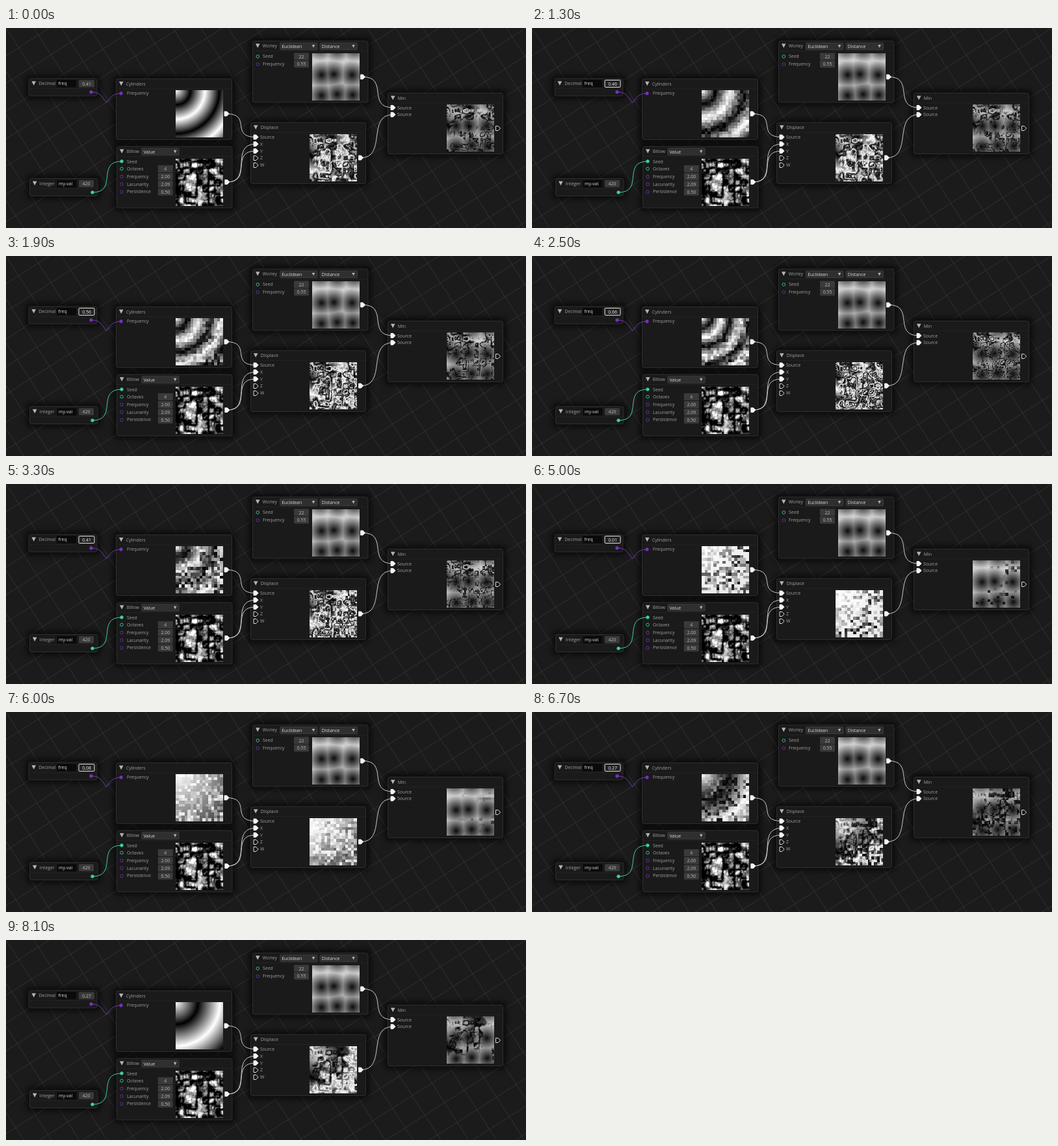
An HTML page with a canvas for the animation above (8200 ms loop, 800 by 309 pixels).

```html
<!DOCTYPE html>
<html lang="en">
<head>
<meta charset="utf-8">
<title>Noise graph</title>
<style>
  html, body { margin: 0; width: 100%; height: 100%; overflow: hidden; background: #1b1b1b; }
  svg, canvas { position: absolute; display: block; }
  svg { left: 0; top: 0; }
  text { font: 6.9px "Open Sans", "Noto Sans", sans-serif; fill: #a0a0a0; white-space: pre; }
  .bright { fill: #dcdcdc; }
  .mid { text-anchor: middle; fill: #bdbdbd; }
</style>
</head>
<body>
<svg id="stage" width="800" height="309" viewBox="0 0 800 309"></svg>
<script>
const LOOP = 8200, STEP = 100, SIZE = 73, TILES = 16, SPAN = 4, MAX_LAG = 500;
const TEAL = '#3ecfa5', PURPLE = '#7733bd', WHITE = '#f4f4f4';

// ---- static drawing helpers ----
const rect = (x, y, w, h, fill, stroke = 'none', r = 1.2) =>
  `<rect x="${x}" y="${y}" width="${w}" height="${h}" rx="${r}" fill="${fill}" stroke="${stroke}" stroke-width=".7"/>`;
const label = (x, y, s, cls = '') => `<text x="${x}" y="${y}" class="${cls}">${s}</text>`;
const arrow = (x, y, r = 3.3) =>
  `<path d="M${x - r} ${y - r}h${2 * r}l${-r} ${2 * r}z" fill="#b4b4b4"/>`;
const button = (x, y, s, w = 23) => rect(x, y, w, 11, '#3a3a3a') + label(x + w / 2, y + 8, s, 'mid');
const field = (x, y, s) => rect(x, y, 30, 11.5, '#0a0a0a') + label(x + 2.5, y + 8, s, 'bright');
const combo = (x, y, s) => rect(x, y, 57.5, 10.5, '#2f2f2f', '#454545') +
  label(x + 2.7, y + 7.8, s, 'bright') + arrow(x + 51.5, y + 5.3, 2.3);
const dot = (x, y, color, full) =>
  `<circle cx="${x}" cy="${y}" r="2.3" fill="${full ? color : '#161616'}" stroke="${color}" stroke-width=".9"/>`;
const tag = (x, y, full = true) =>
  `<path d="M${x - 3.5} ${y - 3.5}h3.7l3.4 3.5l-3.4 3.5h-3.7z" fill="${full ? WHITE : '#161616'}" stroke="${WHITE}" stroke-width=".9"/>`;
const wire = (d, color = '#c8c8c8') => `<path d="${d}" fill="none" stroke="${color}" stroke-width="1"/>`;
const link = (x1, y1, x2, y2, color, bend = 40) =>
  wire(`M${x1} ${y1}C${x1 + bend} ${y1} ${x2 - bend} ${y2} ${x2} ${y2}`, color);

function node(x, y, w, h, title) {
  return `<rect x="${x - 5}" y="${y - 5}" width="${w + 10}" height="${h + 10}" rx="6" fill="#000" opacity=".6" filter="url(#soft)"/>` +
    rect(x, y, w, h, '#191a19', '#3b3b3b', 3.2) +
    `<path d="M${x + 1} ${y + 15.5}h${w - 2}" stroke="#262626" stroke-width=".7"/>` +
    arrow(x + 7.7, y + 7.5) + label(x + 15.3, y + 10.3, title);
}

function grid() {
  let d = '';
  for (let k = -1116; k <= 1116; k += 36) d += `M${k} -1120V1120M-1120 ${k}H1120`;
  return `<path d="${d}" transform="rotate(57.3)" stroke="#383838" stroke-width=".7" fill="none"/>`;
}

const rows = (x, y, step, names) => names.map((s, i) => label(x, y + i * step, s)).join('');

document.getElementById('stage').innerHTML =
  '<defs><filter id="soft" x="-30%" y="-60%" width="160%" height="220%"><feGaussianBlur stdDeviation="4.5"/></filter></defs>' +
  grid() +
  node(35, 78, 105, 27, 'Decimal') + field(78, 80, 'freq') +
  '<g id="num"><rect id="box" x="112" y="80.5" width="24" height="11" rx="1.2"/>' + label(124, 88.5, '', 'mid') + '</g>' +
  node(36.5, 232.5, 104.5, 27, 'Integer') + field(78.5, 235, 'my-val') + button(112, 235, '420') +
  node(169.5, 78.5, 178, 94, 'Cylinders') + label(186, 103, 'Frequency') +
  node(170.5, 183, 177.5, 95, 'Billow') + combo(208.7, 185.8, 'Value') +
  rows(186, 208.5, 11.7, ['Seed', 'Octaves', 'Frequency', 'Lacunarity', 'Persistence']) +
  ['4', '2.00', '2.09', '0.50'].map((s, i) => button(233.8, 212 + i * 11.9, s)).join('') +
  node(379.5, 20, 177.5, 95, 'Worley') + combo(421.5, 23, 'Euclidean') + combo(483, 23, 'Distance') +
  rows(395, 46.2, 11.8, ['Seed', 'Frequency']) + button(443, 38.5, '22') + button(443, 50.3, '0.55') +
  node(376.5, 146, 177, 94.5, 'Displace') + rows(391, 171, 10.8, ['Source', 'X', 'Y', 'Z', 'W']) +
  node(587.5, 100.5, 177, 94, 'Min') + rows(602, 125.5, 10.8, ['Source', 'Source']) +
  wire('M131 99C143 99 146 103 154.5 115.5C162 104 168 101 177 101', PURPLE) +
  link(133, 254, 178, 206, TEAL) +
  link(339, 132.5, 384, 168.5) + link(340, 238, 384, 179.3) + link(340, 238, 384, 190) +
  link(549, 75.5, 595, 123) + link(546, 200.5, 595, 133.8) +
  dot(131, 99, PURPLE, true) + dot(177, 101, PURPLE, true) +
  dot(133, 254, TEAL, true) + dot(178, 206, TEAL, true) + dot(178, 217.5, TEAL) + dot(387.3, 44, TEAL) +
  [229.5, 241.3, 253.3].map(y => dot(178, y, PURPLE)).join('') + dot(387.3, 56, PURPLE) +
  tag(339.5, 132.5) + tag(340.3, 238) + tag(549, 75.5) + tag(546, 200.5) +
  [168.5, 179.3, 190].map(y => tag(384.5, y)).join('') + tag(384.5, 201, false) + tag(384.5, 212, false) +
  tag(595.5, 123) + tag(595.5, 133.8) + tag(757, 155, false);

// ---- value over time ----
const KEYS = [[0, .41], [1000, .41], [1300, .46], [2500, .66], [2700, .66], [3600, .29], [4000, .29],
  [4900, .01], [5500, .01], [6000, .08], [6700, .27], [LOOP, .27]];

function freqAt(t) {
  t = Math.max(0, Math.floor(t / STEP) * STEP);
  const i = Math.max(1, KEYS.findIndex(k => k[0] >= t));
  const [t0, a] = KEYS[i - 1], [t1, b] = KEYS[i];
  return Math.round((a + (b - a) * (t - t0) / (t1 - t0)) * 100) / 100;
}

// ---- noise fields ----
const clamp = (v, lo, hi) => Math.min(hi, Math.max(lo, v));
const hash = (x, y, s) => {
  const v = Math.sin(x * 127.1 + y * 311.7 + s * 74.7) * 43758.5453;
  return v - Math.floor(v);
};
const ease = v => v * v * v * (v * (v * 6 - 15) + 10);

function valueNoise(x, y, s) {
  const ix = Math.floor(x), iy = Math.floor(y), u = ease(x - ix), v = ease(y - iy);
  const at = (a, b) => hash(ix + a, iy + b, s) * 2 - 1;
  const top = at(0, 0) * (1 - u) + at(1, 0) * u;
  return top * (1 - v) + (at(0, 1) * (1 - u) + at(1, 1) * u) * v;
}

function billow(x, y) {
  let sum = 0, f = 2, amp = 1;
  for (let o = 0; o < 4; o++, f *= 2.09, amp *= .42)
    sum += (Math.abs(valueNoise(x * f, y * f, o + 4)) * 2 - 1) * amp;
  return clamp(sum, -1, 1);
}

function rings(x, y, f) {
  const d = Math.hypot(x, y) * f, r = d - Math.floor(d);
  return 255 * (1 - 2 * Math.min(r, 1 - r));
}

const SEEDS = [[14, 33], [33, 32], [61, 33], [14, 65], [38, 63], [62, 64], [12, -11], [38, -9], [64, -10]];
const worley = (x, y) =>
  Math.min(205, 12 + 8.6 * Math.min(...SEEDS.map(p => Math.hypot(x - p[0], y - p[1]))));

const unit = SPAN / SIZE;
const fill = fn => Float32Array.from({ length: SIZE * SIZE }, (_, i) => fn(i % SIZE, Math.floor(i / SIZE)));
const cloud = fill((x, y) => billow(x * unit, y * unit));
const cells = fill(worley);

// ---- previews ----
function preview(x, y) {
  const c = document.createElement('canvas');
  c.width = c.height = SIZE;
  c.style.left = x + 'px';
  c.style.top = y + 'px';
  document.body.append(c);
  const g = c.getContext('2d'), img = g.createImageData(SIZE, SIZE);
  return data => {
    for (let i = 0; i < data.length; i++) {
      img.data.fill(data[i], i * 4, i * 4 + 3);
      img.data[i * 4 + 3] = 255;
    }
    g.putImageData(img, 0, 0);
  };
}

const showRings = preview(261, 96), showWarp = preview(467, 164), showMin = preview(678, 118);
preview(261, 202)(cloud.map(v => 127.5 * (1.1 + 1.4 * v)));
preview(471, 39)(cells);

// Tiles refresh late and coarse while the value is being dragged.
function tiled(t, salt, coarse, shade) {
  const now = freqAt(t), moving = now !== freqAt(t - 200);
  let last = Math.floor(t / STEP);
  while (last > 0 && freqAt(last * STEP) === freqAt((last - 1) * STEP)) last--;
  const out = new Float32Array(SIZE * SIZE), edge = SIZE / TILES;
  for (let j = 0; j < TILES; j++) for (let i = 0; i < TILES; i++) {
    const h = hash(i, j, last + salt);
    const f = freqAt(t - MAX_LAG * h ** 2.2);
    const flat = coarse(now) && (moving ? hash(j, i, last + salt) > .2 : f !== now);
    const x0 = Math.round(i * edge), x1 = Math.round((i + 1) * edge);
    const y0 = Math.round(j * edge), y1 = Math.round((j + 1) * edge);
    const mid = shade(x0 + 2, y0 + 2, f);
    for (let y = y0; y < y1; y++) for (let x = x0; x < x1; x++)
      out[y * SIZE + x] = flat ? mid : shade(x, y, f);
  }
  return out;
}

const plain = (x, y, f) => rings(x * unit, y * unit, f);
const warped = (x, y, f) => {
  const b = cloud[y * SIZE + x];
  return rings(x * unit + b, y * unit + b, f);
};

// ---- playback ----
const box = document.getElementById('box'), digits = document.querySelector('#num text');
let shown = -1;

function draw(t) {
  digits.textContent = freqAt(t).toFixed(2);
  const focus = t >= 1000 && t < 7200, hover = t >= 600 && t < 1000;
  box.setAttribute('fill', focus ? '#242424' : hover ? '#464646' : '#3a3a3a');
  box.setAttribute('stroke', focus ? '#e4e4e4' : hover ? '#8a8a8a' : 'none');
  digits.style.fill = focus ? '#f0f0f0' : '#bdbdbd';
  const warp = tiled(t, 31, f => f < .2, warped);
  showRings(tiled(t, 0, () => true, plain));
  showWarp(warp);
  showMin(warp.map((v, i) => Math.min(v, cells[i])));
}

function tick() {
  const step = Math.floor(performance.now() % LOOP / STEP);
  if (step !== shown) draw((shown = step) * STEP);
  requestAnimationFrame(tick);
}
tick();
</script>
</body>
</html>
```
